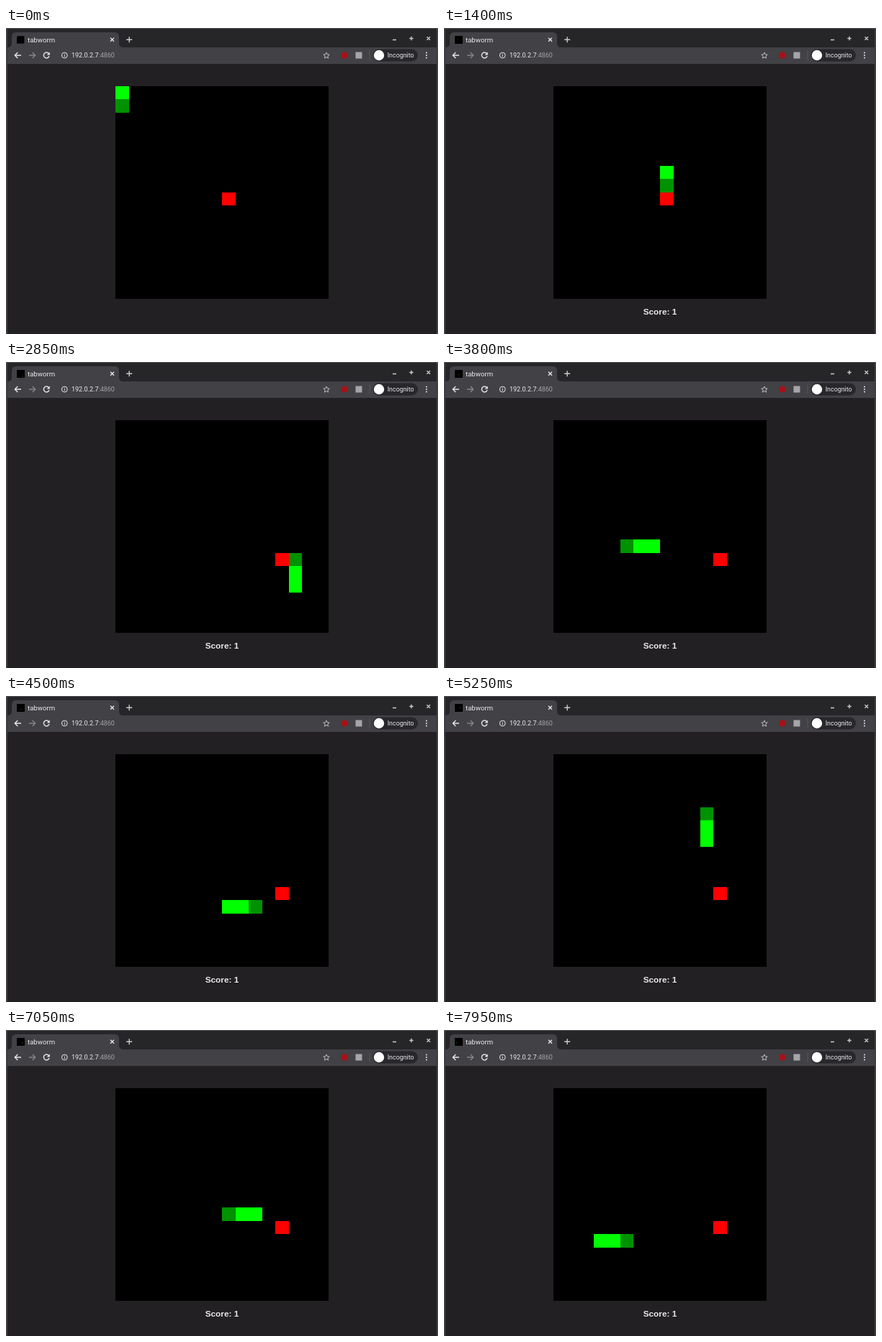
These frames come from a looping animation (600 by 426 pixels, 8 s). An HTML page with a canvas:

```html
<!DOCTYPE html>
<html lang="en">
<head>
<meta charset="utf-8">
<title>tabworm</title>
<style>
  html, body { margin: 0; width: 100%; height: 100%; overflow: hidden; background: #222023; }
  svg, canvas { position: absolute; left: 0; top: 0; width: 600px; height: 426px; display: block; }
  text { font-family: Roboto, sans-serif; fill: #e9e9ea; }
  .line { fill: none; stroke: #e6e6e8; stroke-width: 1.4; }
  #score { font: bold 11.84px "Liberation Sans", Arial, sans-serif; text-anchor: middle; }
</style>
</head>
<body>
<svg viewBox="0 0 600 426">
  <rect width="600" height="426" fill="#222023"/>
  <rect width="600" height="28" fill="#262528"/>
  <path d="M2 27Q8 27 8 21V12Q8 6 14 6H151Q157 6 157 12V21Q157 27 163 27H598V50H2Z" fill="#424146"/>
  <path d="M0 .5H600" stroke="#56565a"/>
  <path d="M1 1V426M599 1V426" stroke="#48474b" stroke-width="1.5"/>

  <!-- tab strip -->
  <text x="30" y="20" font-size="9.6">tabworm</text>
  <path class="line" d="M145 13.7l5 5m0-5l-5 5"/>
  <path class="line" d="M167.2 16.2h8m-4-4v8" stroke-width="1.2" style="stroke:#c9c9cc"/>
  <path class="line" d="M537 16.5h5M560.3 14.5h5.4m-2.7-2.7v5.4M584.5 12.2l4.6 4.6m0-4.6l-4.6 4.6" style="stroke:#c9c9cc"/>

  <!-- toolbar -->
  <path class="line" d="M21 38H12.4M16.3 34l-4 4l4 4"/>
  <path class="line" d="M32 38h8.6M36.7 34l4 4l-4 4" style="stroke:#858488"/>
  <path class="line" d="M59.3 35.5A3.9 3.9 0 1 0 60 39"/>
  <path d="M60.8 33.4v4.2h-4.2z" fill="#e6e6e8"/>
  <circle class="line" cx="81.3" cy="38" r="3.9" style="stroke-width:1"/>
  <path class="line" d="M81.3 37.4v2.8M81.3 35.6v1" style="stroke-width:1"/>
  <text x="91" y="41.3" font-size="9">192.0.2.7<tspan fill="#a4a3a7">:4860</tspan></text>
  <path class="line" d="M445 34l1.2 2.8l3 .3l-2.3 2l.7 3l-2.6-1.6l-2.6 1.6l.7-3l-2.3-2l3-.3z" style="stroke-width:.9;stroke:#c9c9cc"/>
  <circle cx="470" cy="38" r="4.7" fill="#a51218"/>
  <rect x="485.5" y="33.5" width="9" height="9" fill="#a6a5a9"/>
  <path d="M505 31v14" stroke="#57565a"/>
  <rect x="509.5" y="29.5" width="62.5" height="17" rx="8.5" fill="#28272b"/>
  <circle cx="518" cy="38" r="7.2" fill="#fff"/>
  <text x="529.7" y="41.3" font-size="8.88">Incognito</text>
  <g fill="#e6e6e8"><circle cx="584" cy="34.5" r="1"/><circle cx="584" cy="38" r="1"/><circle cx="584" cy="41.5" r="1"/></g>

  <text id="score" x="300" y="398.5">Score: 1</text>
</svg>
<canvas width="600" height="426"></canvas>
<script>
  const LOOP = 8000, STEP = 100, EAT = 15;
  const corners = [[0, 0], [0, 6], [8, 6], [8, 14], [13, 14], [13, 9], [5, 9], [5, 11],
                   [11, 11], [11, 1], [13, 1], [13, 9], [3, 9], [3, 11], [5, 11]];

  // Expand the corners into every cell along the route.
  const route = [corners[0]];
  for (const [cx, cy] of corners.slice(1)) {
    let [x, y] = route[route.length - 1];
    while (x !== cx || y !== cy) {
      x += Math.sign(cx - x);
      y += Math.sign(cy - y);
      route.push([x, y]);
    }
  }

  const ctx = document.querySelector('canvas').getContext('2d');
  const score = document.getElementById('score');

  function stateAt(n) {
    const eaten = n >= EAT;
    const head = n + (eaten ? 2 : 1);
    return {
      snake: route.slice(head - (eaten ? 2 : 1), head + 1),
      food: eaten ? [12, 10] : [8, 8]
    };
  }

  function drawGame({ snake, food }, cell) {
    snake.forEach((c, i) => cell(c, i === snake.length - 1 ? '#009200' : '#00ff00'));
    cell(food, '#ff0000');
  }

  function boardCell([x, y], color) {
    const edge = (start, k) => Math.round(start + k * 18.5);
    const left = edge(152, x), top = edge(80.5, y);
    ctx.fillStyle = color;
    ctx.fillRect(left, top, edge(152, x + 1) - left, edge(80.5, y + 1) - top);
  }

  function iconCell([x, y], color) {
    ctx.fillStyle = color;
    ctx.fillRect(15 + x * 0.64, 11.5 + y * 0.62, 0.64, 0.62);
  }

  function render(t) {
    const n = Math.floor((t + STEP / 2) / STEP);
    ctx.fillStyle = '#000';
    ctx.fillRect(152, 81, 296, 296);
    ctx.fillRect(15, 11.5, 10.2, 9.9);
    drawGame(stateAt(n), boardCell);

    // The tab icon refreshes less often than the board.
    ctx.globalAlpha = 0.6;
    drawGame(stateAt(n - n % 3), iconCell);
    ctx.globalAlpha = 1;

    score.style.visibility = n >= EAT - 1 ? 'visible' : 'hidden';
  }

  const start = performance.now();
  function frame() {
    render((performance.now() - start) % LOOP);
    requestAnimationFrame(frame);
  }
  render(0);
  requestAnimationFrame(frame);
</script>
</body>
</html>
```
